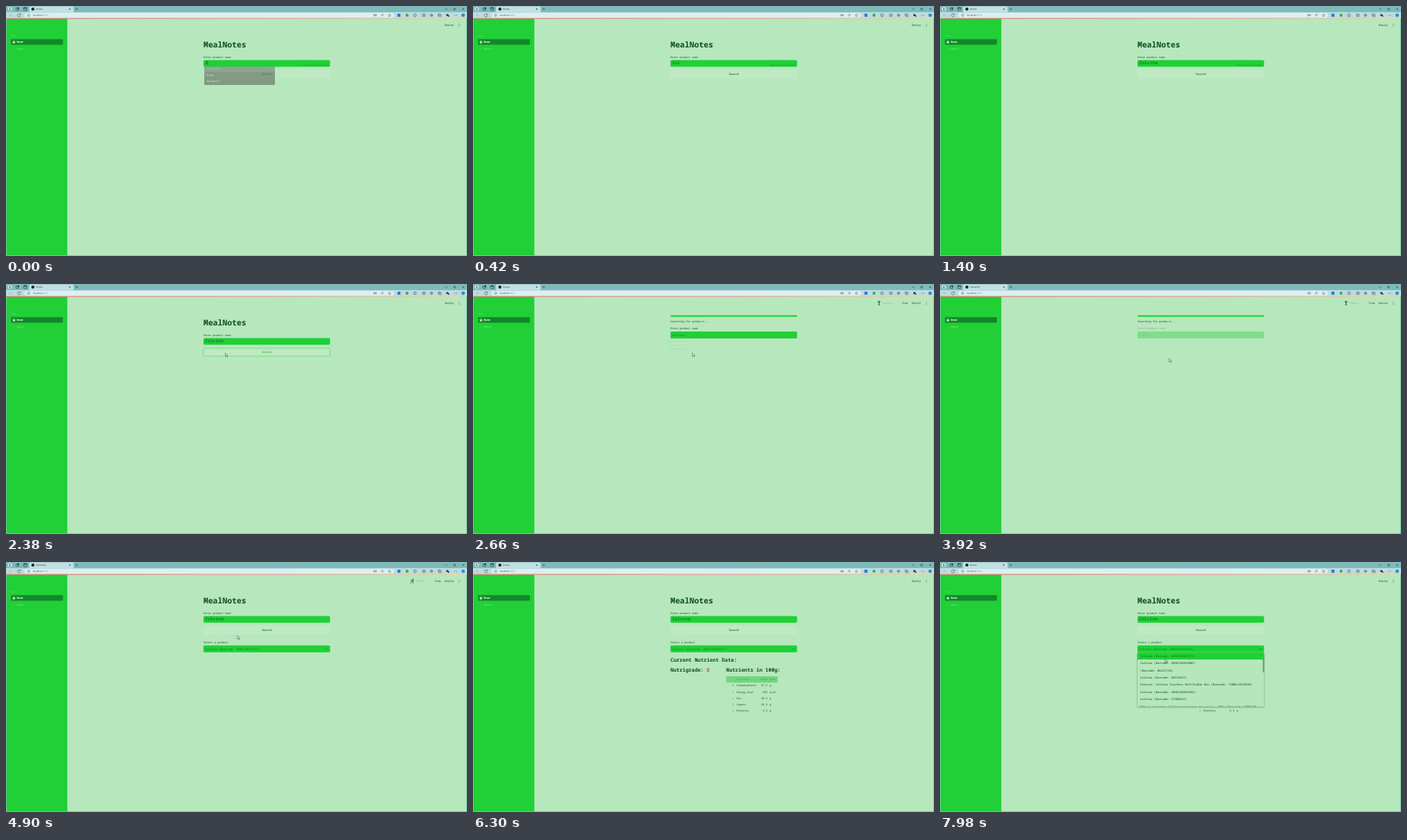
An HTML page for the animation above (8 s loop, 600 by 326 pixels).

```html
<!DOCTYPE html>
<html lang="en">
<head>
<meta charset="utf-8">
<title>Home</title>
<style>
html, body { margin: 0; width: 100%; height: 100%; overflow: hidden; background: #b7e7bd; }
svg { display: block; width: 100vw; height: 100vh; }
text { font-family: "Noto Sans Mono", "DejaVu Sans Mono", monospace; white-space: pre; text-rendering: geometricPrecision; }
.ui { font-family: "Open Sans", "Noto Sans", sans-serif; }
</style>
</head>
<body>
<svg id="stage" viewBox="0 0 600 326" preserveAspectRatio="none">
  <defs>
    <linearGradient id="strip"><stop stop-color="#e8786c"/><stop offset=".6" stop-color="#eaa092"/><stop offset="1" stop-color="#e0dc98"/></linearGradient>
    <clipPath id="dropClip"><rect x="257" y="118" width="165" height="70.6"/></clipPath>
  </defs>
</svg>
<script>
const LOOP = 8000, STEP = 140;
const BG = '#b7e7bd', GREEN = '#20d036', INK = '#0e4f1d', DIM = '#11802a', PALE = '#8fdc99';
const PRODUCT = 'Zolvina';
const stage = document.getElementById('stage');

function el(parent, tag, attrs = {}) {
  const node = document.createElementNS('http://www.w3.org/2000/svg', tag);
  for (const k in attrs) node.setAttribute(k, attrs[k]);
  return parent.appendChild(node);
}
const group = (parent = stage, attrs) => el(parent, 'g', attrs);
const rect = (p, x, y, width, height, fill, rx = 0, more = {}) =>
  el(p, 'rect', { x, y, width, height, fill, rx, ...more });
const dot = (p, cx, cy, r, fill, more = {}) => el(p, 'circle', { cx, cy, r, fill, ...more });
const line = (p, d, stroke = '#24454a', width = 0.5, more = {}) =>
  el(p, 'path', { d, stroke, 'stroke-width': width, fill: 'none', ...more });
// yc is the middle of the capitals
function label(p, x, yc, str, size, fill = INK, more = {}) {
  const node = el(p, 'text', { x, y: yc + size * 0.34, 'font-size': size, fill, ...more });
  node.textContent = str;
  return node;
}
const ui = { class: 'ui' }, bold = { 'font-weight': 700 };
const middle = { 'text-anchor': 'middle' }, right = { 'text-anchor': 'end' };
const code = n => `(Barcode: ${n})`;

// Page and browser window
rect(stage, 0, 0, 600, 326, '#6fbfa8');
rect(stage, 0.8, 16, 598.4, 309.2, BG);
rect(stage, 0.8, 16, 79, 309.2, GREEN);
rect(stage, 0, 0, 600, 8.5, '#7fbabb');
rect(stage, 30, 0.6, 58, 9, '#c2dfe3', 1.5);
rect(stage, 0, 8, 600, 8, '#bcdce0');
rect(stage, 24, 9, 481, 6.2, '#dceff1', 3);
rect(stage, 0.8, 15.8, 598.4, 1, 'url(#strip)');

const bar = group();
dot(bar, 5, 4, 2.5, '#e6f2f3');
dot(bar, 5, 3.4, 0.8, '#30545a');
rect(bar, 3.7, 4.5, 2.6, 1.1, '#30545a', 0.5);
rect(bar, 13, 2.6, 3.6, 3, 'none', 0.5, { stroke: '#16383c', 'stroke-width': 0.6 });
rect(bar, 14.8, 1.8, 2, 2, '#16383c', 0.3);
rect(bar, 23, 2, 4, 4, 'none', 0.4, { stroke: '#16383c', 'stroke-width': 0.6 });
line(bar, 'M23 2.8H27', '#16383c', 1);
dot(bar, 35, 4, 2, '#16282b');
const tabTitle = label(bar, 39, 4, 'Home', 3.1, '#20383b', ui);
line(bar, 'M82 3l2 2m0-2l-2 2M90.4 4h3.2M92 2.4v3.2', '#1d3c40');
line(bar, 'M571.5 4h3M594 3l2.2 2.2m0-2.2l-2.2 2.2', '#143034');
rect(bar, 582.8, 2.9, 2.2, 2.2, 'none', 0.3, { stroke: '#143034', 'stroke-width': 0.5 });
line(bar, 'M8 12H4.5l1.5-1.5M4.5 12l1.5 1.5', '#8fb0b5');
line(bar, 'M18.6 11a2 2 0 1 0 .3 1.6M18.9 9.9v1.4h-1.4');
dot(bar, 29.5, 12, 1.6, 'none', { stroke: '#45666b', 'stroke-width': 0.45 });
line(bar, 'M29.5 11.7v1.2', '#45666b');
const url = label(bar, 35, 12, 'localhost', 3, '#1f3c40', ui);
el(url, 'tspan', { fill: '#7d9ca1' }).textContent = ':8501';
line(bar, 'M478.8 11h1.6v2h-1.6zM481 11.2h1.2v1.6H481', '#3a5c62');
line(bar, 'M488.2 13.5l1.4-3 1.4 3M490.6 10.4l1 .7', '#3a5c62');
line(bar, 'M499.2 10.2l.6 1.2 1.3.2-1 .9.3 1.3-1.2-.6-1.2.6.3-1.3-1-.9 1.3-.2z', '#3a5c62', 0.4);
rect(bar, 509.5, 10.1, 3.8, 3.8, '#2479d4', 0.5);
dot(bar, 522, 12, 1.9, '#2fae4d');
dot(bar, 532.3, 12, 1.7, 'none', { stroke: '#26484d', 'stroke-width': 0.6 });
rect(bar, 542, 10.6, 3.6, 2.8, 'none', 0.4, { stroke: '#26484d', 'stroke-width': 0.5 });
line(bar, 'M543.8 10.6v2.8', '#26484d');
line(bar, 'M552.4 11h2.6l.6 1-.6 1h-2.6zM554 10v4', '#26484d');
rect(bar, 562.5, 10.3, 2.7, 2.7, 'none', 0.4, { stroke: '#26484d', 'stroke-width': 0.5 });
rect(bar, 563.7, 11.4, 2.7, 2.5, '#bcdce0', 0.4, { stroke: '#26484d', 'stroke-width': 0.5 });
rect(bar, 573, 10.5, 2.8, 2.6, '#26484d', 0.5);
dot(bar, 576, 13, 1, '#1b3438');
for (const x of [583.8, 585.3, 586.8]) dot(bar, x, 12, 0.4, '#26484d');
dot(bar, 595, 12, 2.3, '#2c8fd0');

// Sidebar and page toolbar
label(stage, 7, 39, 'Main', 3, '#63dd73');
rect(stage, 6.5, 43.2, 67.6, 7.3, '#14862a', 1);
line(stage, 'M8.4 47l1.9-1.8 1.9 1.8', '#e7f7e9', 0.7);
rect(stage, 9, 46.6, 2.6, 2, '#e7f7e9');
label(stage, 14, 47, 'Home', 3.5, '#eefaf0', bold);
line(stage, 'M9 56.2h2.6', '#5fdd70', 0.5);
label(stage, 14, 55.6, 'About', 3.5, '#82e68e');
label(stage, 571, 25, 'Deploy', 3.35);
for (const y of [23.5, 25, 26.5]) dot(stage, 590, y, 0.45, INK);

const runner = group();
label(runner, 533, 25, 'RUNNING...', 2.8, '#86c592');
label(runner, 558, 25, 'Stop', 3.35);
const poses = [
  'M528.5 23.6v2M526.6 23.2l1.9.8 1.9-.8M528.5 25.5l-.7 2M528.5 25.5l.7 2',
  'M529.4 23.5l-1 2M527 24l2-.2 1.6 1M528.4 25.5l-2 1.8M528.4 25.5l1.5.7v1.4',
  'M528.2 23.6l.3 2M526.5 25l1.8-1.2 2.3-.8M528.5 25.5l-1.6 1.9M528.5 25.5l2 1.3'
];
const body = line(runner, poses[0], INK, 0.7, { 'stroke-linecap': 'round' });
const head = dot(runner, 528.5, 22.6, 0.75, INK);

// Main form
const form = group();
label(form, 257, 50, 'MealNotes', 10.3, INK, bold);
label(form, 257, 66.7, 'Enter product name', 3.35);
rect(form, 257, 70.4, 164.8, 8.8, GREEN, 1.6);
const typed = label(form, 259, 74.3, '', 5.75, '#0d5f20');
const caret = rect(form, 262.2, 71.8, 0.4, 5, '#08290f');
const hint = label(form, 420.3, 77.2, 'Press Enter to apply', 2.8, '#17962c', right);
const button = rect(form, 257, 83.8, 164.8, 10.3, '#bee9c3', 1.6, { 'stroke-width': 0.4 });
const buttonText = label(form, 339.5, 89, 'Search', 3.75, INK, middle);

const popup = group();
rect(popup, 258, 79.3, 92, 23.6, '#6c7d6f', 1.2);
rect(popup, 258, 79.3, 92, 6.4, '#8b9a8d', 1.2, { opacity: 0.55 });
label(popup, 261, 82.5, 'Personal info', 2.9, '#b5c4b7', ui);
line(popup, 'M345.5 81.8l1.4 1.4m0-1.4l-1.4 1.4', '#b5c4b7', 0.3);
label(popup, 261, 90.2, 'Nougat', 2.7, '#fff', ui);
label(popup, 261, 98, 'Manage info', 2.9, '#fff', ui);

// Search in progress
const search = group();
rect(search, 257, 40.8, 164.8, 1.9, GREEN, 0.9);
label(search, 257, 49, 'Searching for products...', 3.35);
const stale = group(search);
label(stale, 257, 58.2, 'Enter product name', 3.35);
rect(stale, 257, 62, 164.8, 9, GREEN, 1.6);
label(stale, 259, 66.6, PRODUCT, 3.75, DIM);
rect(stale, 257, 75.3, 20, 9, '#bbe9c0', 1.6, { stroke: PALE, 'stroke-width': 0.5 });
label(stale, 267, 79.8, 'Search', 3.75, PALE, middle);

// Product selection
const select = group();
label(select, 257, 104.8, 'Select a product', 3.35);
rect(select, 257, 108.8, 164.8, 9, GREEN, 1.6);
label(select, 259, 113.4, `${PRODUCT} ${code('4098120365271')}`, 3.75, DIM);
line(select, 'M416 112.8l1.2 1.2 1.2-1.2', INK, 0.6);

// Nutrients
const data = group();
label(data, 257, 127.6, 'Current Nutrient Data:', 6.55, INK, bold);
const grade = label(data, 257, 141, 'Nutrigrade: ', 6.55, INK, bold);
el(grade, 'tspan', { fill: '#f0363a' }).textContent = 'E';
label(data, 329.5, 141, 'Nutrients in 100g:', 6.55, INK, bold);
rect(data, 329.5, 149, 67, 8.2, '#70d67d', 0.8);
label(data, 343, 153.2, 'Nutrients', 3.35, '#3aa94f');
label(data, 383, 153.2, 'Value', 3.35, '#3aa94f', right);
label(data, 386, 153.2, 'Unit', 3.35, '#3aa94f');
[['Carbohydrates', '57.5', 'g'], ['Energy-kcal', '539', 'kcal'], ['Fat', '30.9', 'g'],
 ['Sugars', '56.3', 'g'], ['Proteins', '6.3', 'g']].forEach(([name, value, unit], i) => {
  const y = 161.2 + i * 8.28;
  label(data, 339.5, y, i, 3.35, '#4f9a5f', right);
  label(data, 343, y, name, 3.35);
  label(data, 383, y, value, 3.35, INK, right);
  label(data, 386, y, unit, 3.35);
});

// Open list
const drop = group();
rect(drop, 256, 119, 166.8, 71.6, '#3d7d4a', 2, { opacity: 0.18 });
rect(drop, 256.6, 118, 165.6, 71.4, '#4f8f5c', 1.6, { opacity: 0.5 });
rect(drop, 257, 118, 164.8, 70.8, '#b5e7bb', 1.2);
rect(drop, 257, 118, 164.8, 9.2, GREEN);
const list = group(drop, { 'clip-path': 'url(#dropClip)' });
[`${PRODUCT} ${code('4098120365271')}`, `${PRODUCT} ${code('4098120362003')}`, code('06421738'),
 `${PRODUCT} ${code('60214957')}`, `Ortevio: ${PRODUCT} Crackers Refillable Box ${code('7300614520938')}`,
 `${PRODUCT} ${code('4098120369484')}`, `${PRODUCT.toLowerCase()} ${code('51904267')}`,
 `Pâte à tartiner ${PRODUCT} noisettes et cacao - 750g (Barcode: 4098120`
].forEach((item, i) => label(list, 260.6, 122.7 + i * 9.38, item, 3.75, i ? INK : '#0d6a22'));
rect(drop, 420.4, 126, 1.3, 18, '#4d8f5a', 0.6);

const cursor = line(stage, 'M0 0v4.4l1.1-1 .8 1.8.8-.4-.8-1.7h1.5z', '#1c2b1f', 0.45, { fill: '#fff' });

// Cursor: time, x, y
const path = [
  [2240, 287, 91], [2380, 285.5, 90], [2800, 285.5, 90], [3920, 298, 97], [4900, 301, 96],
  [6160, 301, 96], [7560, 302, 108], [7700, 299, 112], [7980, 293, 126.5]
];
function along(t) {
  let i = 0;
  while (i < path.length - 2 && t >= path[i + 1][0]) i++;
  const [a, b] = [path[i], path[i + 1]];
  const k = Math.min(1, Math.max(0, (t - a[0]) / (b[0] - a[0])));
  return [a[1] + (b[1] - a[1]) * k, a[2] + (b[2] - a[2]) * k];
}
const show = (node, on) => node.setAttribute('display', on ? 'inline' : 'none');

function draw(now) {
  const t = Math.floor((now % LOOP) / STEP) * STEP;
  const during = (from, to = LOOP) => t >= from && t < to;
  const searching = during(2660, 4760), hover = during(2240, 2660);

  typed.textContent = PRODUCT.slice(0, 1 + Math.floor(t / 200));
  show(caret, t < STEP);
  show(hint, t < 2380);
  show(popup, t < 280);
  popup.setAttribute('opacity', t < STEP ? 0.72 : 0.3);
  button.setAttribute('stroke', hover ? GREEN : '#c9edcd');
  buttonText.setAttribute('fill', hover ? '#1cab31' : INK);

  show(form, !searching);
  show(search, searching);
  stale.setAttribute('opacity', 1 - 0.65 * Math.min(1, Math.max(0, (t - 2940) / 980)));
  show(select, during(4760));
  show(data, during(5180));
  show(drop, during(7840));

  tabTitle.textContent = during(2800, 5460) ? 'Streamlit' : 'Home';
  show(runner, during(2660, 5460));
  const pose = (t - 2660) / STEP % 3;
  if (pose >= 0) {
    body.setAttribute('d', poses[Math.round(pose) % 3]);
    head.setAttribute('cx', [528.5, 530, 528.2][Math.round(pose) % 3]);
  }

  show(cursor, during(2240, 6160) || during(7560));
  cursor.setAttribute('transform', `translate(${along(t)})`);
}

const start = performance.now();
function tick() {
  draw(performance.now() - start);
  requestAnimationFrame(tick);
}
tick();
</script>
</body>
</html>
```
